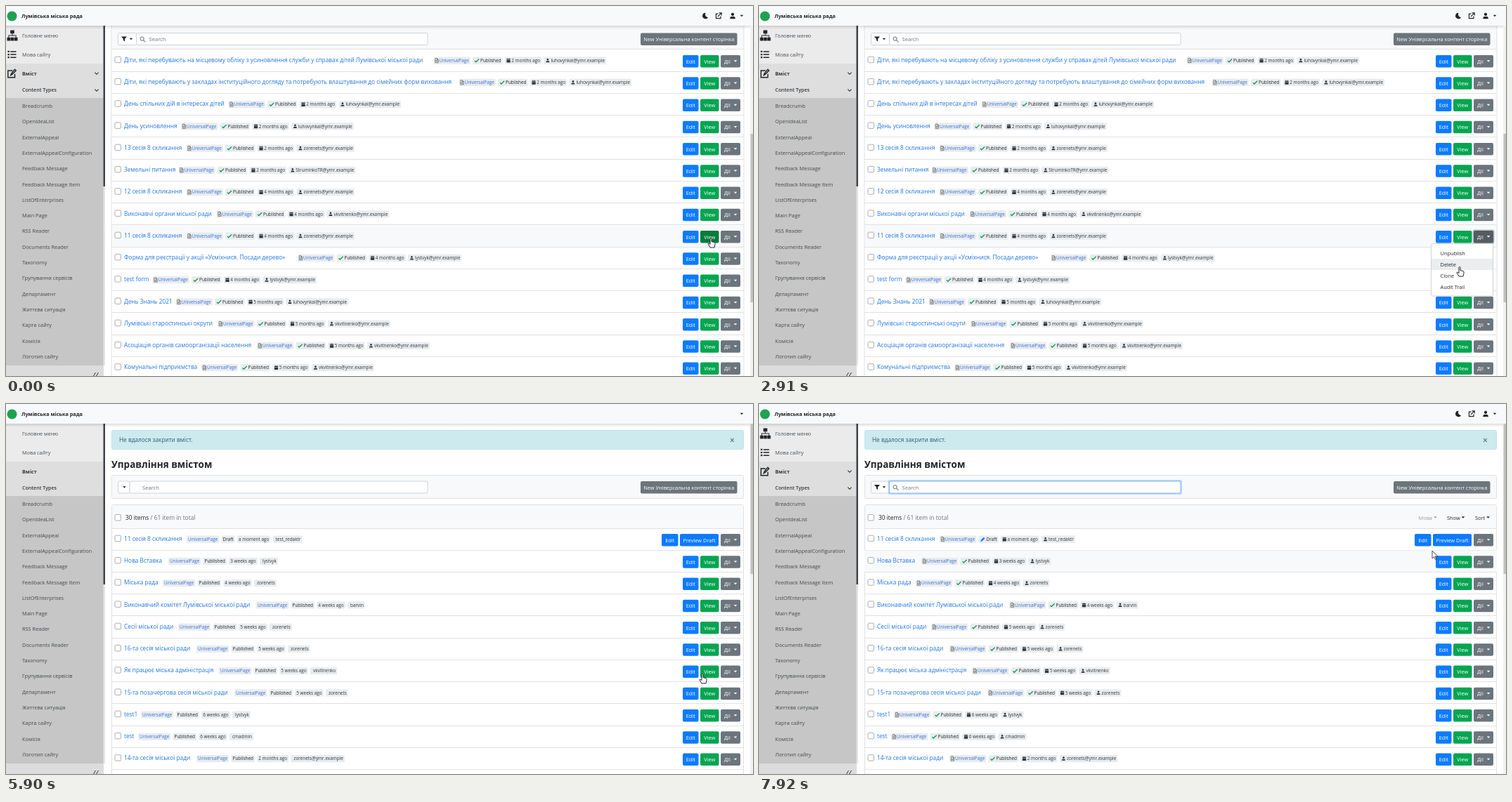
Animation, 1063 px wide and 527 px high, one loop 7990 ms. Source, as an HTML page with a canvas:

```html
<!DOCTYPE html>
<html lang="uk">
<head>
<meta charset="utf-8">
<style>
html, body { margin: 0; width: 100%; height: 100%; overflow: hidden; background: #fff; }
canvas { display: block; width: 1063px; height: 527px; }
</style>
</head>
<body>
<canvas id="stage"></canvas>
<script>
const W = 1063, H = 527, LOOP = 7990, PITCH = 31.25;
const canvas = document.getElementById('stage');
const c = canvas.getContext('2d');
const dpr = window.devicePixelRatio || 1;
canvas.width = W * dpr;
canvas.height = H * dpr;

const BLUE = '#0d7bff', GREEN = '#05a551', GRAY = '#6c757d', INK = '#212529';
const DARK = { [BLUE]: '#0a62cc', [GREEN]: '#087c3c', [GRAY]: '#545b62' };

const MAIL = '@ymr.example';
const U1 = 'luhovynkai' + MAIL, U2 = 'zorenets' + MAIL, U3 = 'vkvitnenko' + MAIL, U4 = 'lystvyk' + MAIL;

// title, x of the first badge, age, author
const oldRows = [
  ['Діти, які перебувають на місцевому обліку з усиновлення служби у справах дітей Лумівської міської ради', 608.5, '2 months', U1],
  ['Діти, які перебувають у закладах інституційного догляду та потребують влаштування до сімейних форм виховання', 644.5, '2 months', U1],
  ['День спільних дій в інтересах дітей', 316.5, '2 months', U1],
  ['День усиновлення', 249, '2 months', U1],
  ['13 сесія 8 скликання', 256.5, '2 months', U2],
  ['Земельні питання', 245, '2 months', 'StruminkoTR' + MAIL],
  ['12 сесія 8 скликання', 256.5, '4 months', U2],
  ['Виконавчі органи міської ради', 299.5, '4 months', U3],
  ['11 сесія 8 скликання', 256.5, '4 months', U2],
  ['Форма для реєстрації у акції «Усміхнися. Посади дерево»', 415, '4 months', U4],
  ['test form', 208.5, '4 months', U4],
  ['День Знань 2021', 241.5, '5 months', U1],
  ['Лумівські старостинські округи', 301, '5 months', U3],
  ['Асоціація органів самоорганізації населення', 357, '5 months', U3],
  ['Комунальні підприємства', 278, '5 months', U3]
];
const newRows = [
  ['11 сесія 8 скликання', 257, 'a moment', 'test_redaktr'],
  ['Нова Вставка', 231, '3 weeks', 'lystvyk'],
  ['Міська рада', 223, '4 weeks', 'zorenets'],
  ['Виконавчий комітет Лумівської міської ради', 356, '4 weeks', 'barvin'],
  ['Сесії міської ради', 245, '5 weeks', 'zorenets'],
  ['16-та сесія міської ради', 271, '5 weeks', 'zorenets'],
  ['Як працює міська адміністрація', 303, '5 weeks', 'vkvitnenko'],
  ['15-та позачергова сесія міської ради', 325, '5 weeks', 'zorenets'],
  ['test1', 192, '6 weeks', 'lystvyk'],
  ['test', 188, '6 weeks', 'cmadmin'],
  ['14-та сесія міської ради', 271, '2 months', U2]
];
const types = ['Breadcrumb', 'OpenIdeaList', 'ExternalAppeal', 'ExternalAppealConfiguration', 'Feedback Message',
  'Feedback Message Item', 'ListOfEnterprises', 'Main Page', 'RSS Reader', 'Documents Reader', 'Taxonomy',
  'Групування сервісів', 'Департамент', 'Життєва ситуація', 'Карта сайту', 'Комісія', 'Логотип сайту'];

// Icons on a 16-unit grid: path and stroke width (0 = filled)
const icons = {
  file: ['M3 1h6l4 4v10H3zM9 1v4h4M5 8h6M5 11h6', 1.6],
  check: ['M1 9l4 4L15 3', 3],
  calendar: ['M1 2h14v3H1zM1 6.5h14V16H1zM4 0h2v3H4zM10 0h2v3h-2z', 0],
  user: ['M8 0a4 4 0 1 0 .01 0zM1 16v-2a4 4 0 0 1 4-4h6a4 4 0 0 1 4 4v2z', 0],
  pencil: ['M0 16l1-5L11 1l4 4L5 15z', 0],
  moon: ['M9 0A8 8 0 1 0 15.500 12A8 8 0 0 1 9 0z', 0],
  open: ['M7 3H2v11h11V9M9 1h6v6M15 1L6 10', 2],
  filter: ['M0 1h16L10 8v7l-4-3V8z', 0],
  search: ['M11 6.500a4.500 4.500 0 1 1-9 0a4.500 4.500 0 0 1 9 0M10 10l5 5', 2.4],
  sitemap: ['M5 0h6v5H5zM0 11h5v5H0zM5.500 11h5v5h-5zM11 11h5v5h-5zM7.500 5h1v2.500H14V11h-1V8.500H3V11H2V7.500h5.500z', 0],
  list: ['M0 1h3v3H0zM5 1.500h11v2H5zM0 6.500h3v3H0zM5 7h11v2H5zM0 12h3v3H0zM5 12.500h11v2H5z', 0],
  edit: ['M9 3H1v12h12V9M6 11l1-3 6-7 2 2-7 7z', 1.8],
  down: ['M2 5l6 6 6-6', 2.4],
  hand: ['M-1 1.200q1-2 2 0v4.300l4 1q1.600.5 1 3L5 14h-6l-3-5q0-1.600 1.700-.5L-1 9.500z', 1],
  arrow: ['M0 0v11l2.600-2.400 1.700 3.900 1.600-.7-1.700-3.800h3.600z', .8]
};
for (const k in icons) icons[k][0] = new Path2D(icons[k][0]);

function icon(name, x, y, size, color = INK) {
  const [path, line] = icons[name];
  c.save();
  c.translate(x - size / 2, y - size / 2);
  c.scale(size / 16, size / 16);
  c.fillStyle = c.strokeStyle = color;
  c.lineWidth = line;
  line ? c.stroke(path) : c.fill(path);
  c.restore();
}

function text(s, x, y, size, color = INK, weight = 400, align = 'left') {
  c.font = `${weight} ${size}px "Open Sans", "Noto Sans", sans-serif`;
  c.fillStyle = color;
  c.textAlign = align;
  c.fillText(s, x, y + size * .35);
  return c.measureText(s).width;
}

function rect(x, y, w, h, fill, r = 0, stroke) {
  c.beginPath();
  c.roundRect(x, y, w, h, r);
  if (fill) { c.fillStyle = fill; c.fill(); }
  if (stroke) { c.strokeStyle = stroke; c.lineWidth = 1; c.stroke(); }
}

function caret(x, y, color = INK, s = 2.3) {
  c.fillStyle = color;
  c.beginPath();
  c.moveTo(x - s, y - s / 2);
  c.lineTo(x + s, y - s / 2);
  c.lineTo(x, y + s / 2);
  c.fill();
}

const checkbox = y => rect(155, y - 4.5, 8.5, 8.5, '#fff', 1.5, '#a9aeb4');

function badge(x, y, label, name, extra, size, loaded, color = '#30363b', iconColor = color) {
  const lead = loaded ? extra : name === 'user' ? 2 : 0;
  c.font = '400 6.4px "Open Sans", "Noto Sans", sans-serif';
  const w = c.measureText(label).width + 4 + lead;
  rect(x, y - 5, w, 10.2, '#e9ecef', 1.5);
  if (loaded) icon(name, x + 1.5 + extra / 2, y, size, iconColor);
  text(label, x + 2 + lead, y, 6.4, color);
  return x + w + 3.3;
}

function button(x, w, y, label, color, hot) {
  rect(x, y - 8.5, w, 17.5, hot ? DARK[color] : color, 2);
  text(label, x + w / 2, y + .5, 7.4, '#fff', 400, 'center');
}

function actions(y, hot, ring) {
  if (ring) rect(1015.5, y - 10, 31, 20.5, `rgba(130,138,145,${.55 * ring})`, 3);
  rect(1017, y - 8.5, 28, 17.5, hot ? DARK[GRAY] : GRAY, 2);
  text('Дії', 1022, y + .5, 7.4, '#fff');
  caret(1038, y, '#fff');
}

function row(data, top, { hover, hot, loaded, ring }) {
  const [title, badgeX, age, user] = data;
  const y = top + 14.7, by = top + 16.2, draft = age === 'a moment';
  if (hover) rect(150, top, 900, PITCH, '#f8f9fa');
  rect(150, Math.round(top + PITCH) - 1, 900, 1, '#dfe1e3');
  checkbox(y - .3);
  const end = 172 + text(title, 168, y, 8.3, '#2176e6');
  let x = Math.max(badgeX, end);
  x = badge(x, y + .6, 'UniversalPage', 'file', 6, 7, loaded, '#3472d8', '#555');
  x = draft ? badge(x, y + .6, 'Draft', 'pencil', 9, 6.5, loaded, INK, BLUE)
            : badge(x, y + .6, 'Published', 'check', 9, 7, loaded, INK, '#119c4b');
  x = badge(x, y + .6, age + ' ago', 'calendar', 7.5, 6, loaded);
  badge(x, y + .6, user, 'user', 8, 5.5, loaded);
  if (draft) {
    button(933, 23.5, by, 'Edit', BLUE);
    button(959, 55, by, 'Preview Draft', BLUE);
  } else {
    button(963, 22.5, by, 'Edit', BLUE, hot === 'edit');
    button(988, 26.5, by, 'View', GREEN, hot === 'view');
  }
  actions(by, hot === 'more', ring);
}

function toolbar(y, loaded, focus, caretOn) {
  const left = loaded ? 185.5 : 176;
  rect(159.5, y - 8.5, left - 159.5, 17, '#fff', 2, '#ced4da');
  if (focus) rect(left - 2, y - 10.5, 418.5, 21, 'rgba(0,123,255,.25)', 3);
  rect(left, y - 8.5, 600 - left, 17, '#fff', 2, focus ? '#80b5f5' : '#ced4da');
  if (loaded) {
    icon('filter', 168, y, 8);
    icon('search', 194.5, y + .5, 9, '#8a9096');
  }
  caret(loaded ? 178 : 168.5, y);
  text('Search', loaded ? 203.5 : 194, y + .5, 7.6, '#6c757d');
  if (caretOn) rect(204, y - 5, .8, 11, '#111');
  button(903, 137.5, y, 'New Універсальна контент сторінка', GRAY);
}

function sidebar(loaded) {
  rect(0, 28, 139, 54, '#ebebeb');
  rect(0, 82, 139, 49, '#dedede');
  rect(0, 131, 139, 381, '#c6c6c6');
  rect(0, 512, 139, 15, '#dcdcdc');
  rect(138.5, 28, 2.5, 484, '#e4e4e4');
  rect(138.5, 28, 2.5, 229, '#3d4248');
  text('Головне меню', 23, 42, 7.3, '#495057');
  text('Мова сайту', 23, 69, 7.3, '#495057');
  text('Вміст', 23, 96, 7.2, '#343a40', 700);
  text('Content Types', 23, 120, 7.1, '#343a40', 600);
  types.forEach((s, i) => text(s, 23, 142.5 + i * 22.3, 7.4, '#43484d'));
  c.strokeStyle = '#333';
  c.lineWidth = 1;
  c.beginPath();
  for (const x of [125, 129]) { c.moveTo(x + 2.5, 522); c.lineTo(x - .5, 527); }
  c.stroke();
  if (!loaded) return;
  icon('sitemap', 9, 42, 15);
  icon('list', 8.5, 69, 12);
  icon('edit', 8.5, 96, 13);
  icon('down', 129, 96, 7);
  icon('down', 129, 120, 7);
}

function topBar(loaded) {
  rect(0, 0, W, 28, '#f8f9fa');
  const shade = c.createLinearGradient(0, 28, 0, 33);
  shade.addColorStop(0, 'rgba(0,0,0,.13)');
  shade.addColorStop(1, 'rgba(0,0,0,0)');
  rect(0, 28, 1059, 5, shade);
  c.beginPath();
  c.arc(8.5, 14.5, 7, 0, 7);
  c.fillStyle = '#1fa150';
  c.fill();
  text('Лумівська міська рада', 22, 14.5, 7.25, INK, 700);
  caret(1047, 14);
  if (!loaded) return;
  icon('moon', 995, 14, 8.5);
  icon('open', 1014, 14, 9.5);
  icon('user', 1034, 14, 8.5);
}

function scrollbar(top, height) {
  rect(1059, 0, 4, H, '#f1f1f1');
  rect(1059.5, top, 3.5, height, '#c1c1c1');
  caret(1061, 5, '#666', -1.4);
}

function menu(tipY) {
  rect(956.5, 338.5, 88, 74.5, '#fff', 2, '#d0d2d4');
  ['Unpublish', 'Delete', 'Clone', 'Audit Trail'].forEach((s, i) => {
    const y = 344 + i * 16;
    if (tipY >= y && tipY < y + 16) rect(957, y, 87, 16, '#ebedef');
    text(s, 969.5, y + 8, 7.4);
  });
}

// start, end, steps, evenly timed waypoints
const moves = [
  [810, 1560, 12, [[1003, 330], [984, 329], [967, 329], [997, 330], [1021, 331]]],
  [1630, 1770, 3, [[1021, 331], [1033, 331]]],
  [2700, 3060, 6, [[1033, 331], [997, 371], [991, 384]]],
  [7090, 7850, 11, [[991, 384], [968, 371], [962, 350], [959, 300], [957, 247]]],
  [7920, 7920, 1, [[957, 247], [958, 209]]]
];

function pointer(t) {
  let pos = moves[0][3][0];
  for (const [from, to, steps, pts] of moves) {
    if (t < from) break;
    const gap = (to - from) / (steps - 1) || 1;
    const p = Math.min(1, (Math.floor((t - from) / gap) + 1) / steps) * (pts.length - 1);
    const i = Math.min(Math.floor(p), pts.length - 2), f = p - i;
    pos = pts[i].map((v, k) => v + (pts[i + 1][k] - v) * f);
  }
  return pos;
}

function hotAt(x) {
  if (x >= 963 && x < 985.5) return 'edit';
  if (x >= 988 && x < 1014.5) return 'view';
  return x >= 1017 && x < 1045 ? 'more' : '';
}

function drawCursor([x, y], name) {
  c.save();
  c.translate(x, y);
  c.lineJoin = 'round';
  c.fillStyle = '#fff';
  c.strokeStyle = '#1b2530';
  c.lineWidth = icons[name][1];
  c.fill(icons[name][0]);
  c.stroke(icons[name][0]);
  c.restore();
}

function oldPage(t, tip) {
  rect(150, 28, 900, 34, '#f8f9fa');
  rect(150, 61, 900, 1, '#dfe1e3');
  const open = t >= 2030;
  const ring = open ? Math.max(0, Math.min(1, (3780 - t) / 210)) : 0;
  const hot = open ? (t < 3640 ? 'more' : '') : hotAt(pointer(t - 110)[0]);
  oldRows.forEach((r, i) => row(r, 62.3 + i * PITCH,
    { loaded: true, hover: i === 8, hot: i === 8 && hot, ring: i === 8 && ring }));
  rect(149.5, 28, 1, 499, '#dfe1e3');
  rect(1049.5, 28, 1, 499, '#dfe1e3');
  toolbar(47, true);
  if (open) menu(tip[1]);
  scrollbar(182, 240);
}

function newPage(t, tip) {
  const loaded = t >= 6230;
  rect(150.5, 37.5, 899, 27, '#cdeaee', 2, '#bee5eb');
  text('Не вдалося закрити вміст.', 161, 51.5, 8.3, '#2b5e68');
  text('×', 1033.5, 52, 12, '#56737a', 600, 'center');
  text('Управління вмістом', 150, 86, 13.5, INK, 700);
  rect(150.5, 101.5, 899, 33, '#f8f9fa', 2, '#dfe1e3');
  const caretOn = loaded && (t < 6640 || t >= 7170 && t < 7700);
  toolbar(118.5, loaded, loaded, caretOn);
  rect(150.5, 143.5, 899, 400, '#fff', 2, '#dfe1e3');
  rect(151, 144, 898, 33, '#f8f9fa');
  rect(150, 177, 900, 1, '#dfe1e3');
  checkbox(162);
  const w = text('30 items', 170, 162, 8.4);
  text(' / 61 item in total', 170 + w, 162, 8.4, GRAY);
  if (t >= 6640) {
    text('Мова', 938.5, 162, 7.4, '#9a9fa4');
    caret(962.5, 161.5, '#9a9fa4');
    text('Show', 979, 162, 7.4);
    caret(1002, 161.5);
    text('Sort', 1019, 162, 7.4);
    caret(1037.5, 161.5);
  }
  const over = t >= 7090 ? Math.floor((tip[1] - 177.3) / PITCH) : -1;
  newRows.forEach((r, i) => row(r, 177.3 + i * PITCH,
    { loaded, hover: i === over, hot: i === over && hotAt(pointer(t - 110)[0]) }));
  scrollbar(10, 232);
}

function draw(t) {
  c.setTransform(dpr, 0, 0, dpr, 0, 0);
  rect(0, 0, W, H, '#fff');
  const tip = pointer(t), loaded = t < 5900 || t >= 6230;
  (t < 5900 ? oldPage : newPage)(t, tip);
  sidebar(loaded);
  topBar(loaded);
  drawCursor(tip, t < 7090 ? 'hand' : 'arrow');
}

const start = performance.now();
function tick() {
  draw((performance.now() - start) % LOOP);
  requestAnimationFrame(tick);
}
tick();
</script>
</body>
</html>
```
